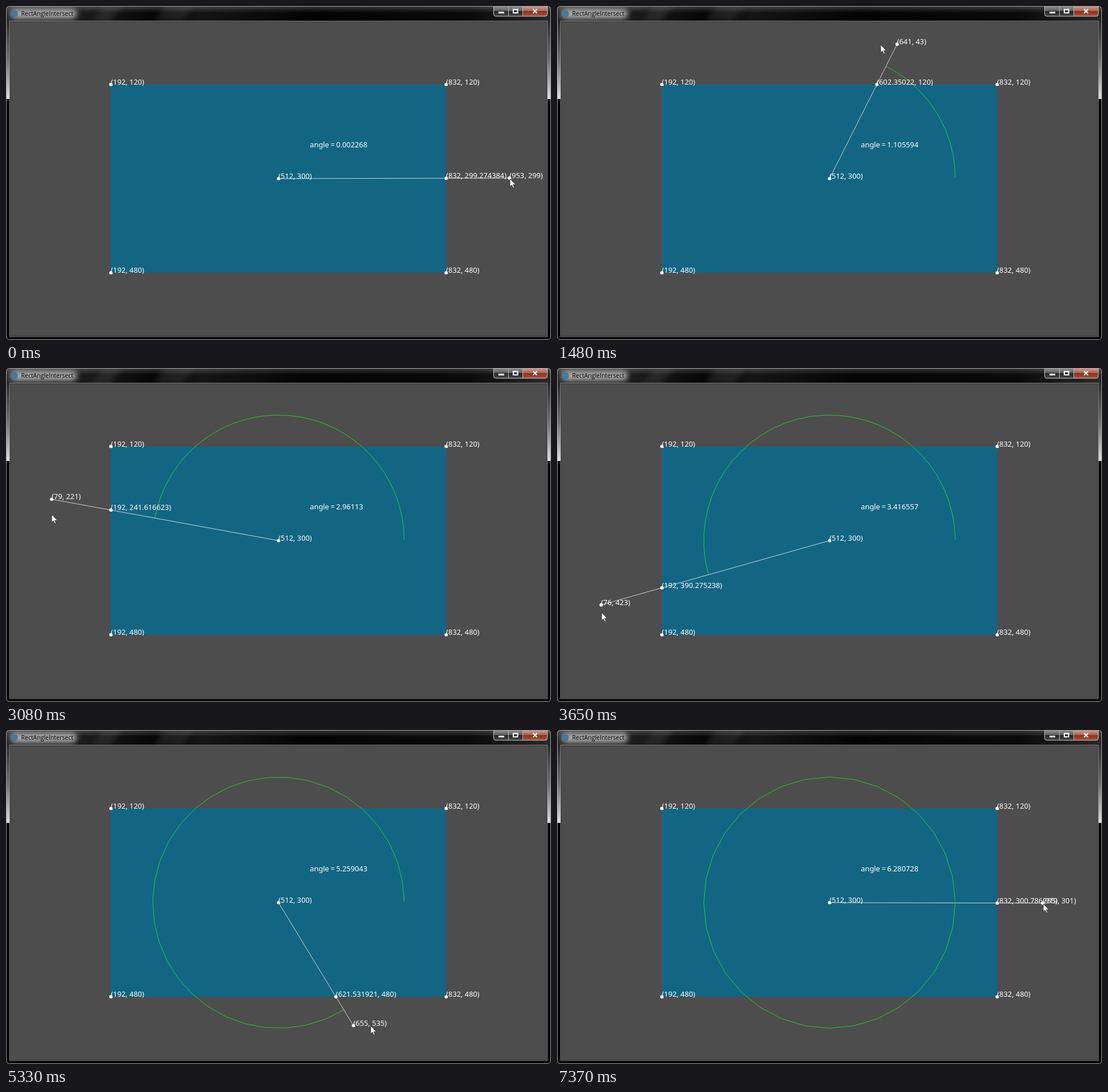
Animation, 955 px wide and 586 px high, one loop 7.63 s. Source, as an HTML page:

```html
<!DOCTYPE html>
<html lang="en">
<head>
<meta charset="utf-8">
<title>RectAngleIntersect</title>
<style>
  html, body { margin: 0; width: 100%; height: 100%; overflow: hidden; background: #000; }
  svg { display: block; }
  .label { font: 12.8px "Noto Sans", sans-serif; fill: #fff; }
  .title { font: 10.5px "Open Sans", sans-serif; fill: #000; }
  .thin { fill: none; stroke-width: .8; }
  #angle { word-spacing: -.75px; }
</style>
</head>
<body>
<svg width="955" height="586" viewBox="0 0 955 586">
  <defs>
    <linearGradient id="bar" x2="1" y2="0">
      <stop offset="0" stop-color="#2a2a2a"/>
      <stop offset=".15" stop-color="#1a1a1a"/>
      <stop offset=".27" stop-color="#060606"/>
      <stop offset=".36" stop-color="#151515"/>
      <stop offset=".55" stop-color="#040404"/>
      <stop offset=".85" stop-color="#0a0a0a"/>
      <stop offset="1" stop-color="#2a2a2a"/>
    </linearGradient>
    <linearGradient id="gloss" x2="0" y2="1">
      <stop offset="0" stop-color="#fff" stop-opacity=".2"/>
      <stop offset="1" stop-color="#fff" stop-opacity="0"/>
    </linearGradient>
    <linearGradient id="side" x2="0" y2="1">
      <stop offset="0" stop-color="#2c2c2c"/>
      <stop offset=".5" stop-color="#707070"/>
      <stop offset="1" stop-color="#dedede"/>
    </linearGradient>
    <linearGradient id="grey" x2="0" y2="1">
      <stop offset="0" stop-color="#8c8c8c"/>
      <stop offset=".48" stop-color="#5a5a5a"/>
      <stop offset=".5" stop-color="#262626"/>
      <stop offset="1" stop-color="#484848"/>
    </linearGradient>
    <linearGradient id="red" x2="0" y2="1">
      <stop offset="0" stop-color="#c79a8e"/>
      <stop offset=".48" stop-color="#ac5c4a"/>
      <stop offset=".5" stop-color="#88321f"/>
      <stop offset="1" stop-color="#a85540"/>
    </linearGradient>
    <filter id="blur" x="-30%" y="-80%" width="160%" height="260%"><feGaussianBlur stdDeviation="5"/></filter>
    <clipPath id="top"><rect x="1" y="1" width="953" height="25"/></clipPath>
    <clipPath id="buttons"><path d="M854 1H949V14Q949 18 945 18H858Q854 18 854 14Z"/></clipPath>
  </defs>

  <!-- window frame -->
  <rect width="955" height="586"/>
  <g clip-path="url(#top)">
    <rect width="955" height="27" fill="url(#bar)"/>
    <rect width="955" height="12" fill="url(#gloss)"/>
    <path d="M150 27L172 0H205L183 27ZM258 27L280 0H330L308 27Z" fill="#fff" opacity=".08" filter="url(#blur)"/>
    <rect x="8" y="5" width="116" height="17" rx="8" fill="#aaa" filter="url(#blur)"/>
  </g>
  <path d="M1 26H6V163H1ZM949 26H954V163H949Z" fill="url(#side)"/>
  <rect x=".5" y=".5" width="954" height="585" rx="5" fill="none" stroke="#a4a4a4"/>
  <rect x="6.5" y="26.5" width="942" height="553.5" fill="#4d4d4d" stroke="#8a8a8a"/>
  <rect x="7.5" y="27.5" width="940" height="551.5" fill="none" stroke="#333"/>
  <circle cx="14.5" cy="13.5" r="6.3" fill="#47799a"/>
  <text class="title" x="26.5" y="17.3">RectAngleIntersect</text>
  <g clip-path="url(#buttons)">
    <rect x="854" y="1" width="51" height="17" fill="url(#grey)"/>
    <rect x="905" y="1" width="44" height="17" fill="url(#red)"/>
    <path d="M880.5 1V18M905.5 1V18" stroke="#b8b8b8"/>
  </g>
  <path d="M854.5 1V14Q854.5 18 858 18H945Q948.5 18 948.5 14V1" fill="none" stroke="#c4c4c4"/>
  <rect x="863" y="10" width="10" height="3" fill="#fff"/>
  <rect x="889" y="6" width="7.5" height="6" fill="none" stroke="#fff" stroke-width="2"/>
  <path d="M923.5 5.5L930.5 12.5M930.5 5.5L923.5 12.5" stroke="#fff" stroke-width="2.3"/>

  <rect x="183.7" y="137.6" width="587.6" height="330.5" fill="#126683"/>
  <line id="ray" class="thin" stroke="#f4f4f4"/>
  <path id="arc" class="thin" stroke="#30e038"/>
  <g id="marks"></g>
  <text id="angle" class="label" x="532.6" y="247.8"></text>
  <path id="cursor" d="M.3 .6V14.8L3.5 11.8L5.8 16.9L7.9 16L5.7 11.1H10.2Z" fill="#fff" stroke="#26262c" stroke-width=".8"/>
</svg>
<script>
const LOOP = 7630, LAG = 65, STEP = 30, NUDGE = 7365;
const SCALE = 0.918, CX = 512, CY = 300, HALF_W = 320, HALF_H = 180, RADIUS = 240;
const clocks = [310, 3410, 5740, 7370];

// pointer path: time, x, y in scene units
const path = [
  [350, 953, 299], [700, 949, 190], [900, 936, 108], [1060, 897, 66], [1250, 785, 49],
  [1480, 641, 43], [1545, 608, 43], [1840, 460, 42], [2470, 168, 42], [2535, 139, 49.6],
  [2620, 122, 62], [2685, 108, 78], [2900, 86, 150], [3200, 77, 275], [3475, 76, 375],
  [3650, 76, 423], [3715, 76, 436], [3950, 95, 475], [4190, 151, 508], [4400, 215, 528],
  [4580, 286, 535], [4645, 317, 535], [4970, 478, 535], [5740, 857, 533], [5805, 890, 530],
  [5900, 915, 508], [6000, 919, 472], [6100, 919, 437], [6165, 919, 415.6], [6400, 919, 360],
  [6700, 919, 320], [6950, 919, 302]
];
const last = path.length - 1;

const $ = id => document.getElementById(id);
const sx = x => 7.5 + x * SCALE;
const sy = y => 27.45 + y * SCALE;
const num = v => String(+v.toFixed(6));
const coord = v => num(Math.fround(v));

function set(el, attrs) {
  for (const k in attrs) el.setAttribute(k, attrs[k]);
}

function make(tag, attrs) {
  const el = document.createElementNS("http://www.w3.org/2000/svg", tag);
  set(el, attrs);
  $("marks").appendChild(el);
  return el;
}

function mark() {
  const dot = make("circle", { r: 2.9, fill: "#fff" });
  const text = make("text", { class: "label" });
  return (x, y) => {
    set(dot, { cx: sx(x), cy: sy(y) });
    set(text, { x: sx(x), y: sy(y) });
    text.textContent = `(${coord(x)}, ${coord(y)})`;
  };
}

const slope = (i, k) => (path[i + 1][k] - path[i][k]) / (path[i + 1][0] - path[i][0]);

// monotone tangent, so the pointer never overshoots a key point
function tangent(i, k) {
  if (i === 0 || i === last) return 0;
  const a = slope(i - 1, k), b = slope(i, k);
  return a * b <= 0 ? 0 : 2 * a * b / (a + b);
}

function pointer(t) {
  if (t >= NUDGE) return [919, 301];
  if (t <= path[0][0]) return path[0].slice(1);
  if (t >= path[last][0]) return path[last].slice(1);
  let i = 0;
  while (path[i + 1][0] <= t) i++;
  const span = path[i + 1][0] - path[i][0];
  const u = (t - path[i][0]) / span, v = 1 - u;
  return [1, 2].map(k =>
    path[i][k] * (1 + 2 * u) * v * v + path[i + 1][k] * u * u * (3 - 2 * u) +
    span * u * v * (tangent(i, k) * v - tangent(i + 1, k) * u));
}

function arcPath(angle) {
  const from = Math.min(0.008, angle), pts = [];
  for (let i = 0; i <= 32; i++) {
    const a = from + (angle - from) * i / 32;
    pts.push(sx(CX + RADIUS * Math.cos(a)).toFixed(2) + " " + sy(CY - RADIUS * Math.sin(a)).toFixed(2));
  }
  return "M" + pts.join("L");
}

function tick(t) {
  const base = clocks.filter(c => c <= t).pop();
  return base === undefined ? 0 : base + Math.floor((t - base) / STEP) * STEP;
}

for (const x of [CX - HALF_W, CX + HALF_W])
  for (const y of [CY - HALF_H, CY + HALF_H]) mark()(x, y);
mark()(CX, CY);
const hit = mark(), tip = mark();

function draw(time) {
  const t = tick(time);
  const [x, y] = pointer(t).map(Math.round);
  const [px, py] = t ? pointer(t + LAG) : [x, y];
  const dx = x - CX, dy = y - CY;
  const k = Math.min(HALF_W / Math.abs(dx), HALF_H / Math.abs(dy));
  let angle = Math.atan2(-dy, dx);
  if (angle < 0) angle += 2 * Math.PI;

  set($("ray"), { x1: sx(CX), y1: sy(CY), x2: sx(x), y2: sy(y) });
  set($("arc"), { d: arcPath(angle) });
  hit(CX + dx * k, CY + dy * k);
  tip(x, y);
  $("angle").textContent = "angle = " + num(angle);
  set($("cursor"), { transform: `translate(${Math.round(sx(px)) + 0.8} ${Math.round(sy(py)) + 0.3})` });
}

const start = performance.now();
function frame() {
  draw((performance.now() - start) % LOOP);
  requestAnimationFrame(frame);
}
frame();
</script>
</body>
</html>
```
